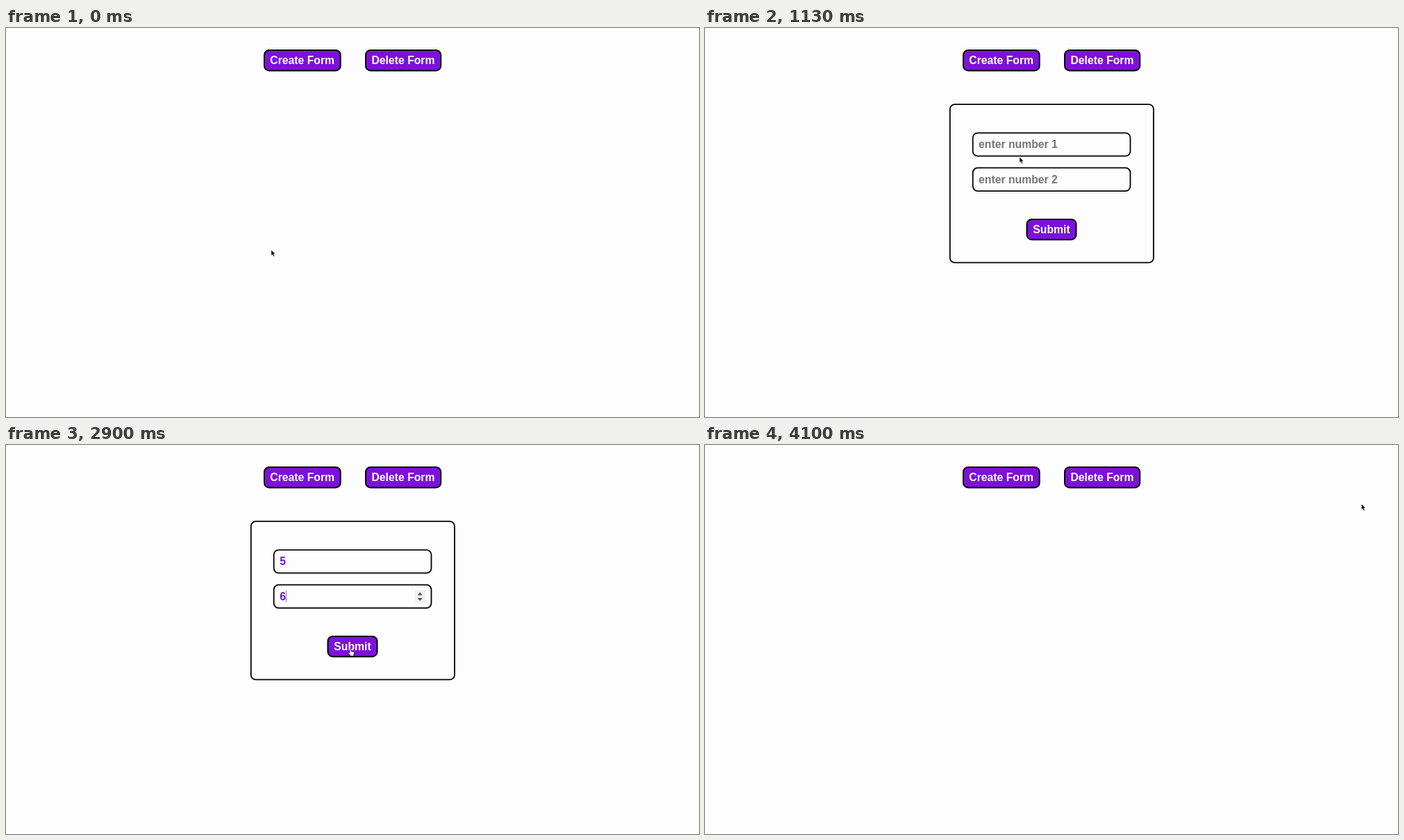
Write an HTML page that moves like this. It is 998 px wide and 561 px high and loops after 4130 ms.

```html
<!DOCTYPE html>
<html lang="en">
<head>
<meta charset="utf-8">
<title>Form demo</title>
<style>
  html, body { margin: 0; width: 100%; height: 100%; overflow: hidden; background: #fdfdfd; }
  svg { display: block; width: 100vw; height: 100vh; }
  text { font: bold 15.75px "Liberation Sans", Arial, sans-serif; }
  .button rect { fill: #7d11da; stroke: #000; stroke-width: 2; }
  .button text { fill: #fff; text-anchor: middle; }
  .frame { fill: #fdfdfd; stroke: #000; stroke-width: 1.8; }
  .hint { fill: #757575; }
  .value { fill: #7413cb; }
  .caret { fill: #8b7a9c; }
  #result {
    font: bold 23.4px "Liberation Serif", "Times New Roman", serif;
    text-anchor: middle; text-decoration: underline;
  }
</style>
</head>
<body>
<svg viewBox="0 0 998 561">
  <g id="create" class="button">
    <rect x="372" y="32" width="109.7" height="29.4" rx="7"/>
    <text x="426.7" y="52">Create Form</text>
  </g>
  <g id="delete" class="button">
    <rect x="518" y="32" width="108.2" height="29.4" rx="7"/>
    <text x="572" y="52">Delete Form</text>
  </g>
  <g id="form">
    <rect class="frame" x="352.8" y="110.1" width="293.2" height="228.3" rx="7"/>
    <g id="fields"></g>
    <g id="submit" class="button">
      <rect x="463.5" y="276" width="71" height="29.2" rx="7"/>
      <text x="499" y="295.8">Submit</text>
    </g>
    <text id="result" x="499" y="392">Multiplication = 30</text>
  </g>
  <g id="cursor">
    <path id="arrow" d="M0 0V8.2L1.8 6.6 3.1 9.6 4.6 9 3.3 6H5.6Z" fill="#000" stroke="#fff" stroke-width=".4"/>
    <path id="hand" d="M-1 1Q0-.6 1 1V4.5L4.6 5.3Q5.6 5.6 5.5 7L4.6 9.5V11.3H-.2V10L-3 6.8Q-3.2 5.4-1 6.6Z" fill="#fff" stroke="#222" stroke-width=".8"/>
    <path id="beam" d="M-1.7-5H1.7M0-5V5M-1.7 5H1.7" fill="none" stroke="#555" stroke-width=".8"/>
  </g>
</svg>
<script>
const LOOP = 4130;
const $ = id => document.getElementById(id);
const show = (el, on) => { el.style.display = on ? "" : "none"; };
const between = (t, a, b) => t >= a && t < b;
const inside = (x, y, l, t, r, b) => x >= l && x <= r && y >= t && y <= b;

// Pointer stops: time, x, y
const stops = [
  [0, 382, 320], [30, 382, 320], [500, 455, 49], [860, 455, 49],
  [1130, 453, 186], [1250, 460, 168], [1720, 460, 168],
  [1960, 468, 217], [2540, 468, 217], [2800, 496, 293],
  [3180, 496, 293], [3530, 588, 65], [3600, 589, 47],
  [3830, 589, 47], [4100, 945.5, 85], [LOOP, 945.5, 85]
];

const presses = { create: [700, 770], submit: [2960, 3020], delete: [3700, 3800] };
const formTime = [770, 3800];
const resultAt = 3020;

const fields = [
  { y: 151.3, hint: "enter number 1", value: "5", focus: 1330, typed: 1480, blur: 2040 },
  { y: 201.7, hint: "enter number 2", value: "6", focus: 2040, typed: 2450, blur: 3020 }
];

for (const f of fields) {
  const g = document.createElementNS("http://www.w3.org/2000/svg", "g");
  const mid = f.y + 16.7;
  g.innerHTML = `
    <rect class="frame" x="385.7" y="${f.y}" width="226.8" height="33.4" rx="7"/>
    <text class="hint" x="394" y="${mid + 5.4}">${f.hint}</text>
    <text class="value" x="394.3" y="${mid + 5.4}">${f.value}</text>
    <g class="spin">
      <rect x="589" y="${mid - 9}" width="14.5" height="18.2" fill="#efefef"/>
      <path transform="translate(596.2 ${mid})" d="M-3.6-2 0-6 3.6-2ZM-3.6 2.4 0 6.4 3.6 2.4Z" fill="#4a4a4a"/>
    </g>
    <rect class="caret" y="${mid - 8.5}" width="1" height="17"/>`;
  $("fields").append(g);
  for (const part of ["hint", "value", "spin", "caret"])
    f[part + "El"] = g.querySelector("." + part);
}

function pointer(t) {
  let i = 1;
  while (i < stops.length - 1 && t > stops[i][0]) i++;
  const [t0, x0, y0] = stops[i - 1], [t1, x1, y1] = stops[i];
  const p = Math.min(1, (t - t0) / (t1 - t0));
  const k = p * p * (3 - 2 * p);
  return [x0 + (x1 - x0) * k, y0 + (y1 - y0) * k];
}

function draw(t) {
  const [x, y] = pointer(t);
  const open = between(t, ...formTime);
  show($("form"), open);
  show($("result"), t >= resultAt);

  for (const id in presses)
    $(id).setAttribute("transform", `translate(0 ${between(t, ...presses[id]) ? -4 : 0})`);

  let kind = "arrow";
  for (const f of fields) {
    const hover = open && inside(x, y, 385, f.y, 613, f.y + 33.4);
    const focused = between(t, f.focus, f.blur);
    const filled = t >= f.typed;
    if (hover) kind = "beam";
    show(f.hintEl, !filled);
    show(f.valueEl, filled);
    show(f.spinEl, hover || focused);
    show(f.caretEl, focused);
    f.caretEl.setAttribute("x", filled ? 403 : 394.3);
  }

  const onButton = inside(x, y, 371, 31, 482, 62) || inside(x, y, 517, 31, 627, 72) ||
    (open && inside(x, y, 462, 275, 536, 306));
  if (onButton) kind = "hand";
  for (const id of ["arrow", "hand", "beam"]) show($(id), id === kind);
  $("cursor").setAttribute("transform", `translate(${x} ${y})`);
}

const start = performance.now();
function tick() {
  draw((performance.now() - start) % LOOP);
  requestAnimationFrame(tick);
}
tick();
</script>
</body>
</html>
```
